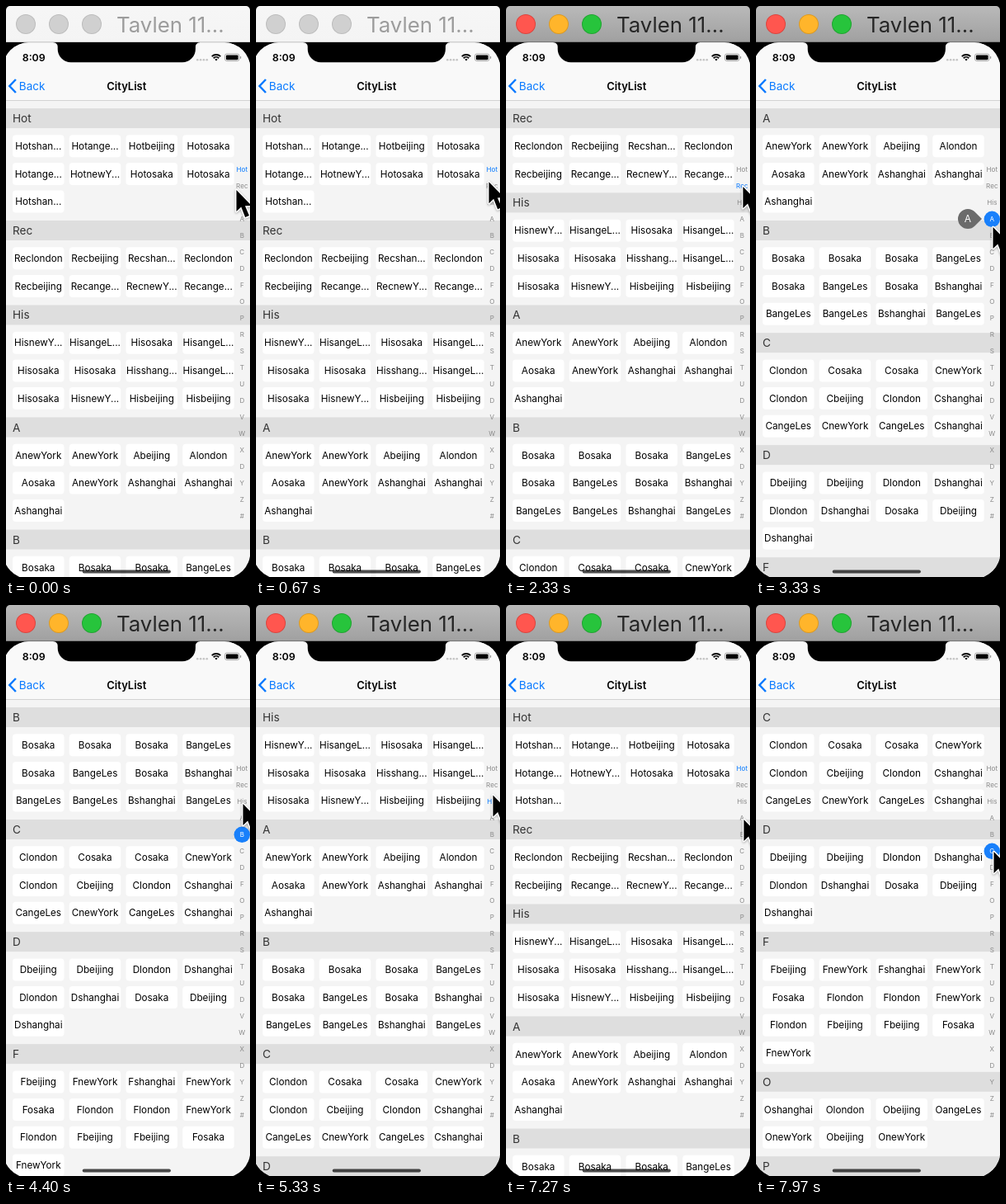
These frames come from a looping animation (296x692 px, 8 s). An HTML page with a canvas:

```html
<!DOCTYPE html>
<html lang="en">
<head>
<meta charset="utf-8">
<title>City list</title>
<style>
html, body { margin: 0; width: 100%; height: 100%; overflow: hidden; background: #000; }
canvas { display: block; width: 296px; height: 692px; }
</style>
</head>
<body>
<canvas id="stage"></canvas>
<script>
const W = 296, H = 692, LOOP = 8000;
const FONT = 'Inter, Roboto, "Liberation Sans", sans-serif';
const BLUE = '#0a7aff';
// The phone screen reaches slightly past the left and bottom edges of the stage
const SCREEN = { x: -3.7, y: 44.3, w: 300, h: 649.5, r: 31.5 };
const MID = SCREEN.x + SCREEN.w / 2;
const canvas = document.getElementById('stage');
const ctx = canvas.getContext('2d');
const dpr = window.devicePixelRatio || 1;
canvas.width = W * dpr;
canvas.height = H * dpr;

const CITIES = { s: 'shanghai', a: 'angeLes', b: 'beijing', o: 'osaka', n: 'newYork', l: 'london' };
// Each letter stands for one city in the section
const SECTIONS = [
  ['Hot', 'saboanoos'], ['Rec', 'lbslbana'], ['His', 'naoaoosaonbb'],
  ['A', 'nnblonsss'], ['B', 'oooaoaosaasa'], ['C', 'loonlblsanas'],
  ['D', 'bblslsobs'], ['F', 'bnsnollnlbbon'], ['O', 'slbanbn'], ['P', '']
];
const INDEX = ['Hot', 'Rec', 'His', ...'ABCDFOPRSTUDVWXDYZ#'];
const HEADER_H = 24, ROW = 33.65, LIST_TOP = 124;

let nextTop = 0;
const list = SECTIONS.map(([name, codes]) => {
  const top = nextTop;
  nextTop += 35.1 + ROW * Math.ceil(codes.length / 4);
  return { name, top, cells: [...codes].map(c => label(name, c)) };
});

// Time, index of the chosen section
const PICKS = [[0, 0], [2050, 1], [2650, 2], [3150, 3], [3620, 4], [4900, 2], [5650, 1], [6450, 0], [7900, 5]];
// Start, end, section shown in the bubble
const BUBBLES = [[3180, 3600, 3], [3640, 3950, 4]];
// Time, x and y of the pointer tip
const POINTER = [
  [0, 279, 222], [400, 279, 222], [1050, 287, 196], [1750, 287, 196], [2050, 287, 215],
  [2350, 287, 218], [2650, 287, 238], [2850, 287, 240], [3150, 287, 260], [3330, 287, 267],
  [3620, 287, 277], [3950, 287, 279], [4350, 287, 240], [5150, 287, 238], [5600, 287, 214],
  [6050, 287, 214], [6450, 287, 197], [6750, 287, 197], [7270, 288, 259], [7400, 288, 261],
  [7850, 288, 298], [8000, 288, 298]
];

function label(name, code) {
  const city = CITIES[code];
  if (name.length === 1 || !'san'.includes(code)) return name + city;
  const keep = name === 'His' && code !== 'n' ? 5 : 4;
  return name + city.slice(0, keep) + '...';
}

function text(str, x, y, size, color, align = 'left', weight = 400) {
  ctx.font = `${weight} ${size}px ${FONT}`;
  ctx.fillStyle = color;
  ctx.textAlign = align;
  ctx.fillText(str, x, y);
}

function box(x, y, w, h, r, color) {
  ctx.beginPath();
  ctx.roundRect(x, y, w, h, r);
  ctx.fillStyle = color;
  ctx.fill();
}

function disc(x, y, r, color) {
  ctx.beginPath();
  ctx.arc(x, y, r, 0, Math.PI * 2);
  ctx.fillStyle = color;
  ctx.fill();
}

function pickAt(t) {
  return PICKS.filter(p => p[0] <= t).pop()[1];
}

function pointerAt(t) {
  const i = POINTER.findIndex(p => p[0] > t);
  const [t0, x0, y0] = POINTER[i - 1], [t1, x1, y1] = POINTER[i];
  const u = (t - t0) / (t1 - t0), k = u * u * (3 - 2 * u);
  return [x0 + (x1 - x0) * k, y0 + (y1 - y0) * k];
}

function drawList(scroll) {
  ctx.fillStyle = '#f4f4f4';
  ctx.fillRect(0, 44, W, H - 44);
  for (const { name, top, cells } of list) {
    const y = LIST_TOP + top - scroll;
    if (y > H || y < LIST_TOP - 1) continue;
    ctx.fillStyle = '#dedede';
    ctx.fillRect(0, y, W, HEADER_H);
    text(name, 8, y + 17, 13.6, '#333');
    cells.forEach((str, i) => {
      const x = 8 + (i % 4) * 68.75, cy = y + 45.8 + Math.floor(i / 4) * ROW;
      if (cy > H + 14) return;
      box(x, cy - 13.5, 62.5, 27, 4, '#fff');
      text(str, x + 31.25, cy + 4.2, 11.7, '#000', 'center');
    });
  }
}

function drawIndex(pick) {
  INDEX.forEach((str, i) => {
    const y = 198 + i * 20, on = i === pick, round = on && str.length === 1;
    if (round) disc(286.3, y + 0.3, 9.7, '#1980fb');
    text(str, 286.3, y + 3, 8.1, round ? '#fff' : on ? BLUE : '#8a8a8a', 'center');
  });
}

function drawBubble(i) {
  const y = 198 + i * 20;
  ctx.beginPath();
  ctx.arc(257, y, 12, Math.PI / 4, -Math.PI / 4);
  ctx.lineTo(274, y);
  ctx.closePath();
  ctx.fillStyle = '#6b6b6b';
  ctx.fill();
  text(INDEX[i], 257, y + 4.3, 12, '#fff', 'center');
}

function drawStatus() {
  text('8:09', 19.7, 67, 12.4, '#000', 'left', 600);
  for (let i = 0; i < 4; i++) disc(232.3 + i * 3.8, 65.2, 1.3, '#c4c4c4');
  ctx.strokeStyle = '#000';
  ctx.lineWidth = 1.8;
  for (const r of [4.6, 7.5]) {
    ctx.beginPath();
    ctx.arc(255, 66.5, r, -Math.PI * 0.75, -Math.PI * 0.25);
    ctx.stroke();
  }
  ctx.beginPath();
  ctx.moveTo(255, 66.5);
  ctx.arc(255, 66.5, 2.4, -Math.PI * 0.75, -Math.PI * 0.25);
  ctx.fillStyle = '#000';
  ctx.fill();
  ctx.beginPath();
  ctx.roundRect(265.5, 58, 17.5, 8.6, 2.4);
  ctx.strokeStyle = '#999';
  ctx.lineWidth = 0.8;
  ctx.stroke();
  box(266.9, 59.4, 14.7, 5.8, 1.2, '#000');
  box(284, 61, 1.2, 2.8, 0.6, '#999');
}

function drawNav() {
  ctx.fillStyle = '#f9f9f9';
  ctx.fillRect(0, 44, W, 70);
  ctx.fillStyle = '#c6c6c6';
  ctx.fillRect(0, 114, W, 0.7);
  drawStatus();
  ctx.beginPath();
  ctx.moveTo(11.9, 89);
  ctx.lineTo(4.3, 97);
  ctx.lineTo(11.9, 105);
  ctx.strokeStyle = BLUE;
  ctx.lineWidth = 2.5;
  ctx.stroke();
  text('Back', 15.8, 102, 13.5, BLUE);
  text('CityList', MID, 101.8, 13, '#000', 'center', 600);
}

function drawNotch() {
  const half = 83.6, top = SCREEN.y, bottom = top + 24, flare = 5, r = 16;
  const left = MID - half, right = MID + half;
  ctx.beginPath();
  ctx.moveTo(left - flare, top - 1);
  ctx.lineTo(left - flare, top);
  ctx.arcTo(left, top, left, top + flare, flare);
  ctx.arcTo(left, bottom, left + r, bottom, r);
  ctx.arcTo(right, bottom, right, bottom - r, r);
  ctx.arcTo(right, top, right + flare, top, flare);
  ctx.lineTo(right + flare, top - 1);
  ctx.fillStyle = '#000';
  ctx.fill();
}

function drawTitleBar(active) {
  const fill = ctx.createLinearGradient(0, 0, 0, 44);
  fill.addColorStop(0, active ? '#b9b9b9' : '#f6f6f6');
  fill.addColorStop(1, active ? '#a0a0a0' : '#f4f4f4');
  box(0, 0, W, 44, [5, 5, 0, 0], fill);
  ctx.fillStyle = active ? '#777' : '#cfcfcf';
  ctx.fillRect(0, 43, W, 1);
  const lights = active
    ? [['#ff564f', '#dc443e'], ['#ffb52b', '#dc9a22'], ['#27c43c', '#1fa530']]
    : Array(3).fill(['#d0d0d0', '#bcbcbc']);
  lights.forEach(([inner, rim], i) => {
    disc(24 + i * 40, 22, 12, rim);
    disc(24 + i * 40, 22, 11, inner);
  });
  text('Tavlen 11...', 134, 32, 25.8, active ? '#262626' : '#9c9c9c');
}

function drawPointer(x, y) {
  ctx.save();
  ctx.translate(x, y);
  ctx.beginPath();
  ctx.moveTo(0.5, 1);
  for (const [px, py] of [[0.5, 27], [6.3, 21.6], [11.2, 34], [16, 32], [11, 20.2], [19, 20]]) ctx.lineTo(px, py);
  ctx.closePath();
  ctx.shadowColor = 'rgba(0,0,0,.3)';
  ctx.shadowBlur = 3 * dpr;
  ctx.shadowOffsetY = dpr;
  ctx.lineJoin = 'round';
  ctx.lineWidth = 3;
  ctx.strokeStyle = '#fff';
  ctx.stroke();
  ctx.shadowColor = 'transparent';
  ctx.fillStyle = '#000';
  ctx.fill();
  ctx.restore();
}

function draw(t) {
  const pick = pickAt(t);
  const bubble = BUBBLES.find(([from, to]) => t >= from && t < to);
  ctx.setTransform(dpr, 0, 0, dpr, 0, 0);
  ctx.fillStyle = '#000';
  ctx.fillRect(0, 0, W, H);
  ctx.save();
  ctx.beginPath();
  ctx.roundRect(SCREEN.x, SCREEN.y, SCREEN.w, SCREEN.h, SCREEN.r);
  ctx.clip();
  drawList(list[pick].top);
  drawIndex(pick);
  if (bubble) drawBubble(bubble[2]);
  drawNav();
  box(MID - 53.6, 683.4, 107.2, 4, 2, 'rgba(0,0,0,.7)');
  ctx.restore();
  drawNotch();
  drawTitleBar(t >= 700);
  drawPointer(...pointerAt(t));
}

const start = performance.now();
function tick() {
  draw((performance.now() - start) % LOOP);
  requestAnimationFrame(tick);
}
tick();
</script>
</body>
</html>
```
